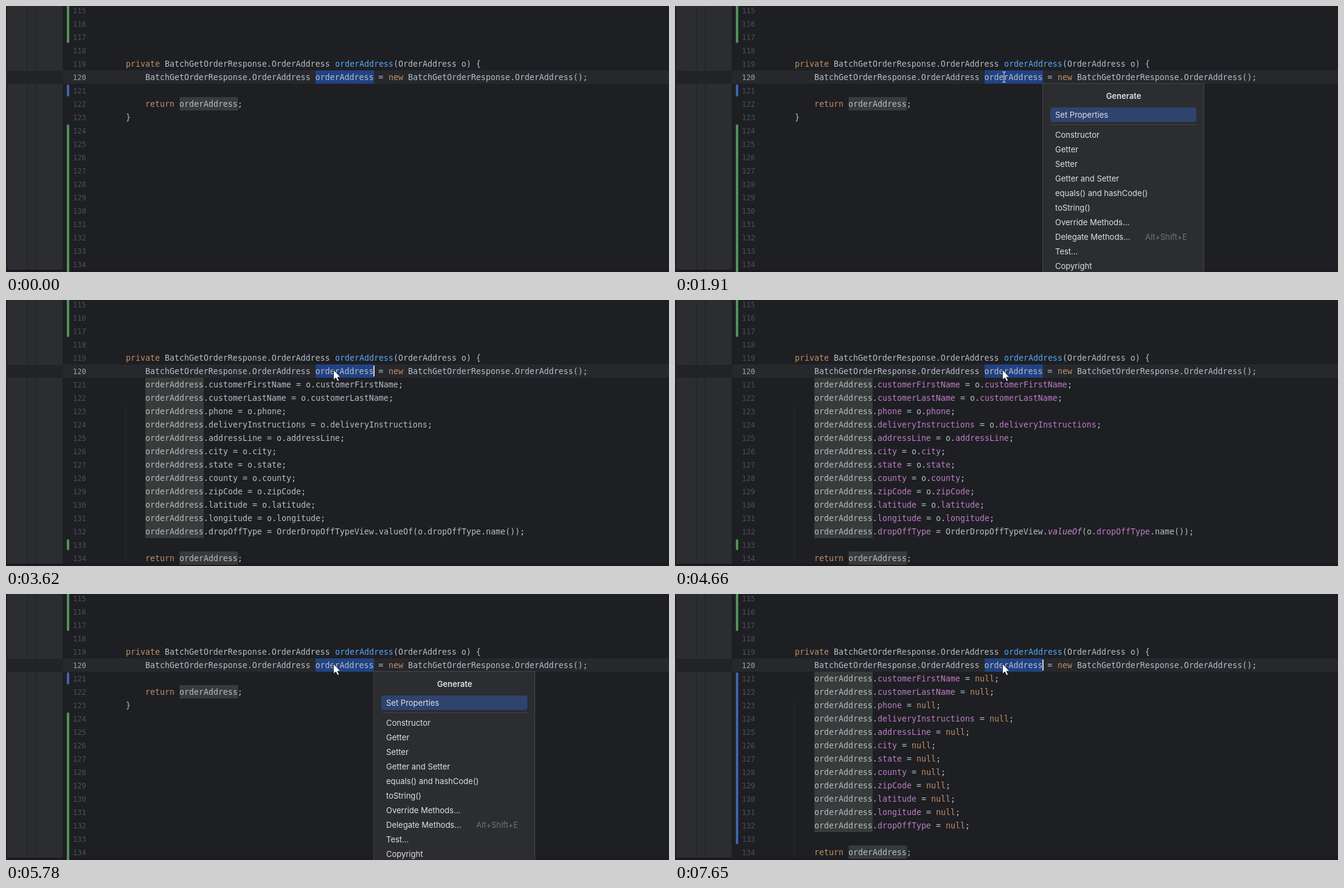
An HTML page for the animation above (8000 ms loop, 1090 px wide and 438 px high).

```html
<!DOCTYPE html>
<html lang="en">
<head>
<meta charset="utf-8">
<title>Generate property setters</title>
<style>
  html, body { margin: 0; width: 100%; height: 100%; overflow: hidden; background: #1e1f22; }
  svg { display: block; width: 100%; height: 100%; }
  text { white-space: pre; }
  .code { font: 13.288px "DejaVu Sans Mono", monospace; fill: #b4bec8; }
  .number { font: 12px "DejaVu Sans Mono", monospace; fill: #4b5059; }
  .number.current { fill: #a1a3ab; }
  .keyword { fill: #bf8f68; }
  .method { fill: #56a8f5; }
  .field { fill: #bd7cc8; }
  .static { fill: #c48fd6; font-style: italic; }
  .plain .field, .plain .static { fill: inherit; font-style: normal; }
  .usage { fill: #373b39; }
  .added { fill: #549159; }
  .changed { fill: #3f63ae; }
  .popup { fill: #2b2d30; stroke: #43454a; }
  .choice { fill: #2e436e; }
  .ui { font: 13px Inter, sans-serif; fill: #dfe1e5; }
  .title { font-weight: 600; }
  .shortcut { fill: #6f737a; }
</style>
</head>
<body>
<svg id="stage" viewBox="0 0 1090 438"></svg>
<script>
const LOOP = 8000, ROW = 22, CHAR = 8, FIRST_LINE = 115;
const LEFT = 197, INDENT = 229;
const stage = document.getElementById("stage");

function add(parent, tag, attrs = {}, text) {
  const node = document.createElementNS("http://www.w3.org/2000/svg", tag);
  for (const key in attrs) node.setAttribute(key, attrs[key]);
  if (text !== undefined) node.textContent = text;
  parent.appendChild(node);
  return node;
}
const group = (parent = stage) => add(parent, "g");
const rect = (parent, x, y, width, height, attrs) =>
  add(parent, "rect", { x, y, width, height, ...attrs });
const label = (parent, x, y, text, name = "") =>
  add(parent, "text", { x, y, class: "ui " + name }, text);
const show = (node, on) => node.setAttribute("visibility", on ? "inherit" : "hidden");
const rowTop = line => (line - FIRST_LINE) * ROW - 4;
const baseline = line => rowTop(line) + 16;

// Marks: `field`, ^method^, ~static~
const MARKS = { "`": "field", "^": "method", "~": "static" };
const KEYWORD = /^(private|new|return|null)$/;
function code(parent, line, x, source) {
  let column = 0;
  const parts = source.split(/(`[^`]+`|\^[^^]+\^|~[^~]+~|\b(?:private|new|return|null)\b)/);
  const text = add(parent, "text", { class: "code", y: baseline(line) });
  for (const part of parts.filter(Boolean)) {
    const mark = MARKS[part[0]];
    const word = mark ? part.slice(1, -1) : part;
    const name = mark || (KEYWORD.test(word) ? "keyword" : "");
    add(text, "tspan", { x: x + column * CHAR, class: name }, word);
    column += word.length;
  }
}
const usage = (parent, line, x, rows = 1) =>
  rect(parent, x, rowTop(line), 12 * CHAR, rows * ROW, { class: "usage" });
const bar = (parent, top, bottom, kind) =>
  rect(parent, 100, top, 4, bottom - top, { class: kind, rx: 2 });

// Editor background and gutter
rect(stage, 0, 0, 1090, 438, { fill: "#1e1f22" });
rect(stage, 2, 0, 91, 438, { fill: "#2b2d30" });
rect(stage, 0, 107, 100, 21, { fill: "#222327" });
for (const x of [34, 49]) rect(stage, x, 0, 1.5, 438, { fill: "#232427" });
rect(stage, 94, rowTop(120), 996, ROW, { fill: "#26282c" });
rect(stage, 0, 434, 1090, 4, { fill: "#1e1922" });
bar(stage, -5, 61, "added");
for (let line = FIRST_LINE; line < FIRST_LINE + 20; line++) {
  add(stage, "text", {
    x: 110, y: baseline(line), class: "number" + (line === 120 ? " current" : "")
  }, line);
}
const selection = rect(stage, 509, rowTop(120), 96, ROW, { fill: "#214283" });
code(stage, 119, LEFT, "private BatchGetOrderResponse.OrderAddress ^orderAddress^(OrderAddress o) {");
code(stage, 120, INDENT, "BatchGetOrderResponse.OrderAddress orderAddress = new BatchGetOrderResponse.OrderAddress();");

function returnLine(parent, line) {
  usage(parent, line, 285.5);
  code(parent, line, INDENT, "return orderAddress;");
}

const empty = group();
bar(empty, 129, 149, "changed");
bar(empty, 195, 445, "added");
returnLine(empty, 122);
code(empty, 123, LEFT, "}");

const FIELDS = ["customerFirstName", "customerLastName", "phone", "deliveryInstructions",
  "addressLine", "city", "state", "county", "zipCode", "latitude", "longitude", "dropOffType"];

function assignments(valueOf) {
  const block = group();
  rect(block, 196, 173, 1, 261, { fill: "#292b2e" });
  usage(block, 121, INDENT, FIELDS.length);
  FIELDS.forEach((field, i) =>
    code(block, 121 + i, INDENT, `orderAddress.\`${field}\` = ${valueOf(field)};`));
  returnLine(block, 134);
  return block;
}
const copied = assignments(field => field === "dropOffType"
  ? "OrderDropOffTypeView.~valueOf~(o.`dropOffType`.name())" : `o.\`${field}\``);
bar(copied, 394, 412, "added");
const nulled = assignments(() => "null");
bar(nulled, 129, 412, "changed");

const caret = rect(stage, 604, 108, 2, 18, { fill: "#ced0d6" });

// Popups
const menu = group();
rect(menu, 604.5, 127.5, 265, 330, { class: "popup" });
label(menu, 737.5, 153, "Generate", "title").setAttribute("text-anchor", "middle");
rect(menu, 617, 167, 240, 24, { class: "choice", rx: 4 });
label(menu, 625, 184, "Set Properties");
rect(menu, 619, 195, 240, 1, { fill: "#43454a" });
["Constructor", "Getter", "Setter", "Getter and Setter", "equals() and hashCode()", "toString()",
  "Override Methods...", "Delegate Methods...", "Test...", "Copyright"
].forEach((item, i) => label(menu, 625, 217 + i * 24, item));
label(menu, 773, 385, "Alt+Shift+E", "shortcut");

const picker = group();
rect(picker, 604.5, 127.5, 272, 120, { class: "popup" });
label(picker, 615, 153, "Select Local Variable To Set Properties :", "title");
const choice = rect(picker, 617, 167, 247, 24, { class: "choice", rx: 4 });
["OrderAddress o", "None", "Expand Properties None"]
  .forEach((item, i) => label(picker, 625, 184 + i * 24, item));

// Pointers
const beam = group();
add(beam, "path", {
  d: "M-3-8.5H-1Q0-8.5 0-7.5Q0-8.5 1-8.5H3M0-7.5V7.5M-3 8.5H-1Q0 8.5 0 7.5Q0 8.5 1 8.5H3",
  fill: "none", stroke: "#d0d2d6", "stroke-width": 1.2
});
const arrow = add(stage, "path", {
  d: "M538.5 115V131.5L542.3 128L545 133.8L547.6 132.7L545 127H550Z",
  fill: "#fff", stroke: "#111", "stroke-width": .8
});

const within = (t, ...spans) => spans.some(([from, to]) => t >= from && t < to);

const PATH = [[0, 965, 402], [.3, 800, 270], [.6, 590, 130], [.78, 524, 98], [1, 541, 125]];
function beamPosition(t) {
  if (t >= 1340) return [541, 117];
  if (t >= 1180) return [541, 112];
  if (t >= 1100) return [541, 120];
  const p = Math.min(1, Math.floor((t - 310) / 590 * 9 + .001) / 9);
  const next = Math.max(1, PATH.findIndex(point => point[0] >= p));
  const [a, ax, ay] = PATH[next - 1], [b, bx, by] = PATH[next];
  const k = (p - a) / (b - a);
  return [ax + (bx - ax) * k, ay + (by - ay) * k];
}

function draw(t) {
  const hasCopied = within(t, [3620, 4860]);
  const hasNulled = t >= 7370;
  show(empty, !hasCopied && !hasNulled);
  show(copied, hasCopied);
  show(nulled, hasNulled);
  copied.setAttribute("class", t < 3970 ? "plain" : "");
  nulled.setAttribute("class", t < 7650 ? "plain" : "");

  const clicked = within(t, [1260, 1420]);
  show(selection, !clicked);
  show(caret, clicked || within(t, [1420, 1910], [3620, 4660], [4860, 5700], [7280, LOOP]));
  caret.setAttribute("x", clicked ? 540 : 604);

  show(menu, within(t, [1910, 2610], [5700, 6340]));
  show(picker, within(t, [2730, 3620], [6340, 7280]));
  choice.setAttribute("y", t >= 6740 ? 191 : 167);

  show(beam, within(t, [310, 2230]));
  if (within(t, [310, 2230])) beam.setAttribute("transform", `translate(${beamPosition(t)})`);
  show(arrow, t >= 2230);
}

const start = performance.now();
function tick() {
  draw((performance.now() - start) % LOOP);
  requestAnimationFrame(tick);
}
draw(0);
requestAnimationFrame(tick);
</script>
</body>
</html>
```
